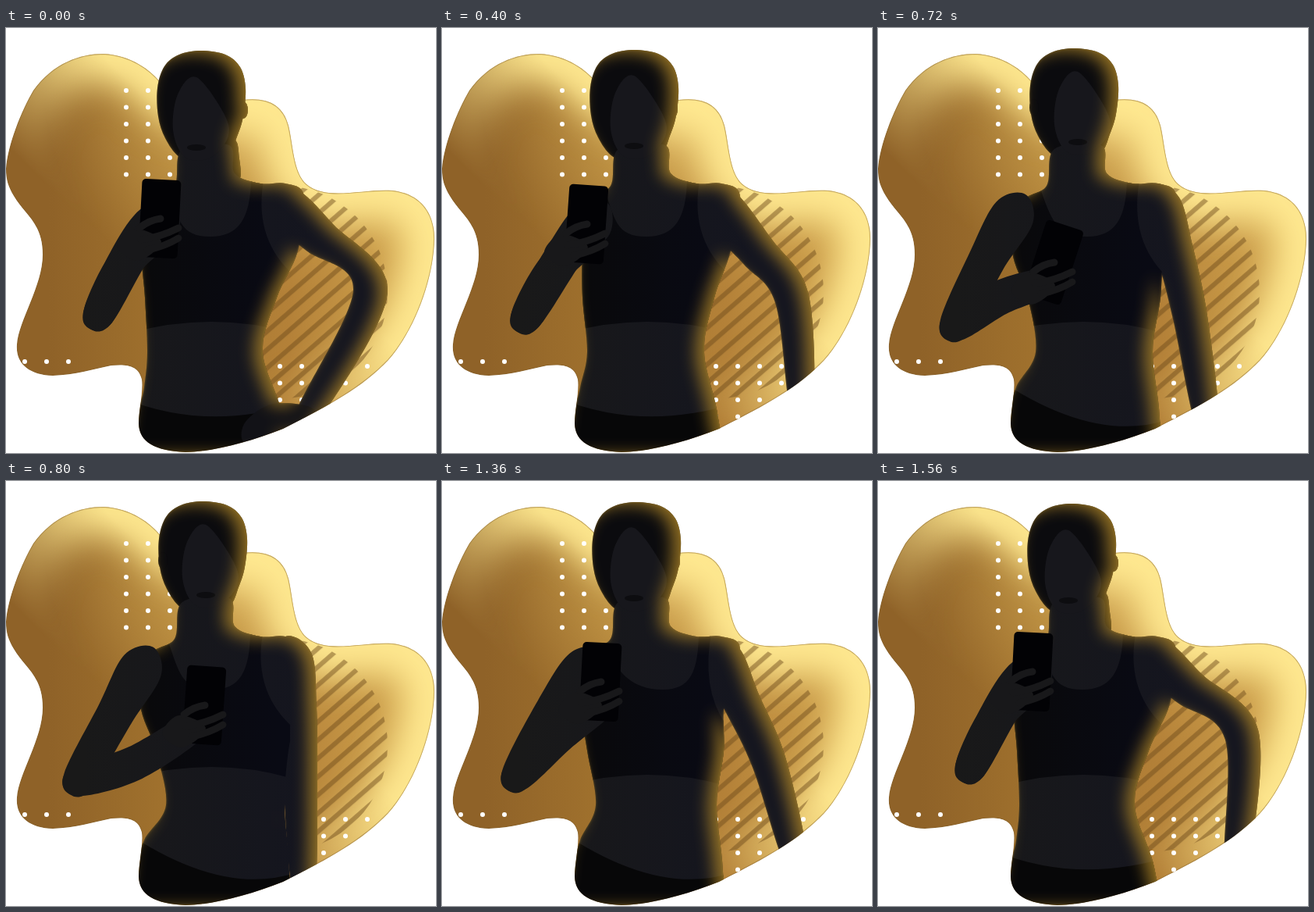
These frames come from a looping animation (551x544 px, 1.68 s). An HTML page:

```html
<!DOCTYPE html>
<html lang="en">
<head>
<meta charset="utf-8">
<title>Mirror pose</title>
<style>
html, body { margin: 0; width: 100%; height: 100%; overflow: hidden; background: #fff; }
svg { display: block; width: 100%; height: 100%; }
</style>
</head>
<body>
<svg viewBox="0 0 551 544">
  <defs>
    <path id="blob" d="M0 180C2 150 20 105 35 80C60 45 95 33 125 33C160 35 185 53 200 72C225 95 265 97 303 92C335 88 355 98 362 125C368 150 368 185 385 200C410 222 460 205 495 208C530 212 549 235 549 270C548 320 525 385 490 425C455 462 410 485 355 513C310 531 260 543 230 543C190 541 170 530 170 505C170 490 176 465 174 450C170 432 155 430 135 432C110 437 90 444 60 445C30 444 12 430 14 405C16 375 47 330 47 290C47 250 25 240 10 215C3 203 0 195 0 180Z"/>
    <clipPath id="inBlob"><use href="#blob"/></clipPath>
    <clipPath id="inFigure"><use href="#blob"/><rect x="150" width="200" height="240"/></clipPath>
    <linearGradient id="base" gradientUnits="userSpaceOnUse" x1="0" x2="551" y1="0" y2="0">
      <stop offset=".1" stop-color="#8f6228"/><stop offset=".4" stop-color="#a2732e"/>
      <stop offset=".66" stop-color="#b48138"/><stop offset="1" stop-color="#d9ae55"/>
    </linearGradient>
    <radialGradient id="top" gradientUnits="userSpaceOnUse" cx="310" cy="85" r="260">
      <stop stop-color="#f6d67c" stop-opacity=".8"/>
      <stop offset=".45" stop-color="#eec768" stop-opacity=".4"/>
      <stop offset="1" stop-color="#e0b55a" stop-opacity="0"/>
    </radialGradient>
    <linearGradient id="light" gradientUnits="userSpaceOnUse" x1="0" y1="150" x2="120" y2="30">
      <stop stop-color="#000"/><stop offset="1" stop-color="#fff"/>
    </linearGradient>
    <mask id="lit" maskUnits="userSpaceOnUse" x="0" y="0" width="551" height="544">
      <rect width="551" height="544" fill="url(#light)"/>
    </mask>
    <linearGradient id="skin" gradientUnits="userSpaceOnUse" x1="100" x2="400" y1="0" y2="0">
      <stop stop-color="#191919"/><stop offset="1" stop-color="#14151f"/>
    </linearGradient>
    <linearGradient id="cloth" gradientUnits="userSpaceOnUse" x1="180" x2="350" y1="0" y2="0">
      <stop stop-color="#09090b"/><stop offset="1" stop-color="#090a14"/>
    </linearGradient>
    <pattern id="stripes" y="8" width="40" height="17.7" patternUnits="userSpaceOnUse" patternTransform="rotate(-41)">
      <rect y="6" width="40" height="6" fill="#6e4b1c" fill-opacity=".48"/>
    </pattern>
    <filter id="soft" filterUnits="userSpaceOnUse" x="-60" y="-60" width="680" height="680">
      <feGaussianBlur stdDeviation="23"/>
    </filter>
    <!-- gold light falling into the silhouette from the right, plus a thin rim -->
    <filter id="rim" filterUnits="userSpaceOnUse" x="0" y="0" width="551" height="620" color-interpolation-filters="sRGB">
      <feFlood flood-color="#b58a28"/>
      <feComposite in2="SourceAlpha" operator="out" result="outside"/>
      <feGaussianBlur stdDeviation="10"/>
      <feOffset dx="-11" dy="3"/>
      <feComposite in2="SourceAlpha" operator="in"/>
      <feComponentTransfer result="glow"><feFuncA type="linear" slope=".75"/></feComponentTransfer>
      <feGaussianBlur in="outside" stdDeviation="1.5"/>
      <feComposite in2="SourceAlpha" operator="in"/>
      <feComponentTransfer result="edge"><feFuncA type="linear" slope=".45"/></feComponentTransfer>
      <feMerge><feMergeNode in="SourceGraphic"/><feMergeNode in="glow"/><feMergeNode in="edge"/></feMerge>
    </filter>
  </defs>
  <g clip-path="url(#inBlob)">
    <use href="#blob" fill="url(#base)"/>
    <use href="#blob" fill="url(#top)"/>
    <g mask="url(#lit)">
      <use href="#blob" fill="none" stroke="#ffe991" stroke-width="78" filter="url(#soft)"/>
    </g>
    <use href="#blob" fill="none" stroke="#80602e" stroke-opacity=".45" stroke-width="2"/>
    <circle cx="353" cy="338" r="136" fill="url(#stripes)"/>
    <g id="dots" fill="#fff"></g>
  </g>
  <g id="figure" clip-path="url(#inFigure)"></g>
</svg>
<script>
const $ = id => document.getElementById(id);

function add(parent, tag, attrs) {
  const node = document.createElementNS('http://www.w3.org/2000/svg', tag);
  for (const key in attrs) node.setAttribute(key, attrs[key]);
  return parent.appendChild(node);
}

const shape = (parent, d, fill) => add(parent, 'path', { d, fill });
const ellipse = (parent, cx, cy, rx, ry, fill) => add(parent, 'ellipse', { cx, cy, rx, ry, fill });

function dotGrid(x, y, cols, rows) {
  for (let c = 0; c < cols; c++)
    for (let r = 0; r < rows; r++)
      ellipse($('dots'), x + c * 28, y + r * 21.5, 3, 3, '#fff');
}
dotGrid(154, 80, 3, 6);
dotGrid(24, 427, 3, 1);
dotGrid(351, 433, 5, 4);

// Closed smooth curve through the points.
function smooth(p) {
  const n = p.length;
  let d = 'M' + p[0];
  p.forEach((a, i) => {
    const z = p[(i + n - 1) % n], b = p[(i + 1) % n], c = p[(i + 2) % n];
    const h1 = a.map((v, k) => v + (b[k] - z[k]) / 6);
    const h2 = b.map((v, k) => v - (c[k] - a[k]) / 6);
    d += `C${h1} ${h2} ${b}`;
  });
  return d + 'Z';
}

// Rounded limb around a chain of joints, one radius per joint.
function limb(joints, radii) {
  const left = [], right = [], last = joints.length - 1;
  const caps = joints.map(([x, y], i) => {
    const a = joints[Math.max(i - 1, 0)], b = joints[Math.min(i + 1, last)];
    const angle = Math.atan2(b[1] - a[1], b[0] - a[0]), r = radii[i];
    const dx = r * Math.cos(angle), dy = r * Math.sin(angle);
    left.push([x + dy, y - dx]);
    right.unshift([x - dy, y + dx]);
    return i ? [x + dx, y + dy] : [x - dx, y - dy];
  });
  return smooth([...left, caps[last], ...right, caps[0]]);
}

// Joints run from shoulder to wrist; sides give the torso's x from armpit to hip.
const hip = {
  head: [0, 3], face: [-2, 1], ear: 304, tail: 1,
  right: [[352, 225], [402, 268], [467, 337], [388, 494]],
  upper: [[200, 245], [165, 280], [118, 368]],
  fore: [[118, 368], [152, 302], [192, 266]],
  sideR: [374, 347, 329, 355], sideL: [174, 178, 181],
  strap: 314, neckline: 262, hem: 390, turn: 0, phone: [197, 244, 3], resting: 1
};
const dropped = { ...hip, head: [-2, 3], right: [[352, 225], [400, 266], [466, 325], [460, 485]], resting: 0 };
const lowered = {
  ...dropped, head: [-4, 2], face: [0, -1], tail: 0, ear: 300,
  right: [[352, 225], [405, 287], [448, 345], [461, 480]],
  upper: [[195, 245], [160, 285], [107, 372]],
  fore: [[107, 372], [143, 309], [182, 275]],
  sideR: [370, 349, 336, 354], sideL: [180, 180, 186], phone: [185, 251, 4]
};
const sideways = {
  ...lowered, head: [-1, 1], face: [0, -2],
  right: [[356, 225], [385, 285], [419, 360], [452, 480]],
  upper: [[185, 237], [143, 294], [95, 379]],
  fore: [[95, 379], [150, 326], [205, 285]],
  sideR: [362, 361, 352, 360], sideL: [178, 186, 197],
  strap: 329, neckline: 283, turn: 1, phone: [203, 257, 3]
};
const tilted = {
  ...sideways, head: [1, 0], face: [10, -6], ear: 199,
  right: [[360, 225], [380, 285], [400, 370], [421, 500]],
  upper: [[175, 236], [139, 298], [98, 382]],
  fore: [[98, 382], [155, 346], [212, 326]],
  sideR: [366, 362, 352, 361], sideL: [172, 192, 202],
  strap: 319, neckline: 268, phone: [225, 300, 18]
};
const atChest = {
  ...tilted, head: [2, 0],
  right: [[365, 225], [374, 290], [377, 380], [381, 512]],
  upper: [[175, 236], [140, 298], [92, 384]],
  fore: [[92, 384], [165, 361], [245, 312]],
  sideR: [375, 362, 357, 363], sideL: [172, 192, 205],
  strap: 313, neckline: 264, hem: 380, phone: [254, 287, 4]
};

const midway = (a, b) => Array.isArray(a) ? a.map((v, i) => midway(v, b[i])) : (a + b) / 2;
const turning = {};
for (const key in lowered) turning[key] = midway(lowered[key], sideways[key]);

const hair = smooth([[250, 26], [281, 31], [300, 47], [307, 74], [304, 110], [296, 136], [284, 160],
  [250, 172], [222, 162], [204, 138], [195, 110], [194, 74], [203, 46], [222, 31]]);
const faceShape = smooth([[246, 62], [282, 110], [286, 140], [262, 166], [231, 164], [216, 130], [222, 84]]);
const levels = [285, 345, 415, 500];

function torso({ sideR, sideL }) {
  const right = sideR.map((x, i) => [x, levels[i]]);
  const left = sideL.map((x, i) => [x, levels[i]]).reverse();
  return smooth([[286, 150], [293, 186], [326, 199], [358, 199], [382, 215], ...right, [360, 610], [165, 610],
    [170, 500], [177, 460], ...left, [184, 224], [216, 202], [226, 155]]);
}

const bra = ({ strap: s, neckline: n, hem }) =>
  `M${s} 190C${s} 245 ${n + 35} 267 ${n} 267C${n - 40} 267 222 245 206 200H188V255L160 300V${hem}` +
  `Q265 ${hem - 28} 364 ${hem}V312Q${s + 2} 265 ${s + 17} 190Z`;

const pants = ({ turn }) =>
  `M150 ${474 - 27 * turn}Q${255 + 20 * turn} ${516 + 16 * turn} 370 ${482 + 20 * turn}V610H150Z`;

function build(pose, index) {
  const whole = add($('figure'), 'g', { visibility: 'hidden' });
  const body = add(whole, 'g', { filter: 'url(#rim)' });
  const head = add(body, 'g', { transform: `translate(${pose.head})` });
  shape(head, hair, '#0b0b0e');
  ellipse(head, pose.ear, 102, 6, 11, '#0b0b0e');
  if (pose.tail) shape(head, limb([[288, 145], [292, 165], [295, 186]], [8, 7, 6]), '#0b0b0e');

  const outline = torso(pose), clip = 'torso' + index;
  shape(add(whole, 'clipPath', { id: clip }), outline);
  shape(body, outline, 'url(#skin)');
  shape(body, limb(pose.right, [27, 24, 22, 16]), 'url(#skin)');
  const clothes = add(body, 'g', { 'clip-path': `url(#${clip})` });
  shape(clothes, bra(pose), 'url(#cloth)');
  shape(clothes, pants(pose), '#070708');
  if (pose.resting) shape(body, limb([[386, 500], [345, 498], [318, 518]], [16, 17, 18]), '#121217');

  const face = add(body, 'g', { transform: `translate(${pose.face})` });
  shape(face, faceShape, '#17171c');
  ellipse(face, 246, 152, 12, 4, '#0d0d10');

  shape(whole, limb(pose.upper, [27, 24, 20]), 'url(#skin)');
  shape(whole, limb(pose.fore, [20, 22, 18]), 'url(#skin)');
  const [x, y, angle] = pose.phone;
  const held = add(whole, 'g', { transform: `translate(${x} ${y})` });
  add(held, 'rect', { x: -25, y: -50, width: 50, height: 100, rx: 5, fill: '#020205', transform: `rotate(${angle})` });
  shape(held, limb([[-34, 34], [-12, 31]], [20, 14]), '#18181a');
  add(held, 'path', {
    d: 'M-26 12Q-14 2 1 0M-24 27Q0 24 24 12M-16 40Q6 36 24 25',
    fill: 'none', stroke: '#18181a', 'stroke-width': 9, 'stroke-linecap': 'round'
  });
  return whole;
}

const LOOP = 1680;
const steps = [
  [0, hip], [320, dropped], [400, lowered], [520, turning], [600, sideways], [720, tilted],
  [800, atChest], [1280, tilted], [1360, sideways], [1480, lowered], [1560, dropped]
];
const views = new Map();
for (const [, pose] of steps)
  if (!views.has(pose)) views.set(pose, build(pose, views.size));

let shown;
function draw() {
  const t = performance.now() % LOOP;
  const next = views.get(steps.findLast(([start]) => start <= t)[1]);
  if (next !== shown) {
    if (shown) shown.setAttribute('visibility', 'hidden');
    next.setAttribute('visibility', 'visible');
    shown = next;
  }
  requestAnimationFrame(draw);
}
draw();
</script>
</body>
</html>
```
